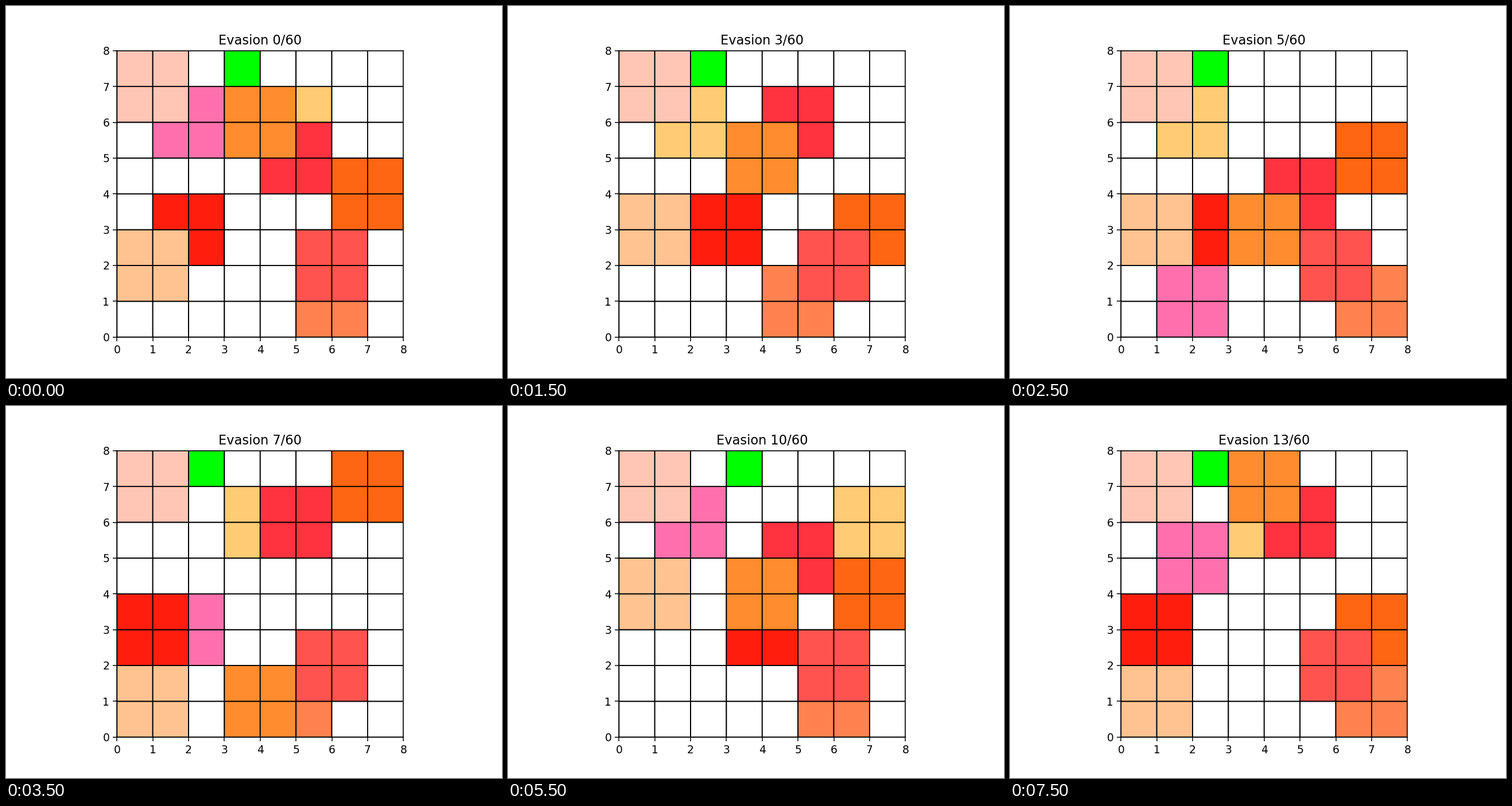
Animation, 864 px wide and 648 px high, one loop 8000 ms. Source, as a matplotlib script:

```python
import numpy as np
import matplotlib.pyplot as plt
from matplotlib.animation import FuncAnimation
from matplotlib.colors import ListedColormap

SIZE = 8
CYCLE = 60
FRAMES = 16
WAITS = (11, 14)            # only the runner moves here, the guards pause
RUNNER_RIGHT = (0, 11, 12, 13)

# Guards watch 2x2 blocks, painted back to front:
# colour, axis of travel, fixed coordinate, low end, high end, phase
GUARDS = [
    ("#ffcb74", "x", 5, 0, 6, 8),
    ("#ff70ad", "y", 1, 0, 6, 7),
    ("#ff6611", "y", 6, 1, 6, 8),
    ("#ff8250", "x", 0, 4, 6, 1),
    ("#ff1d0e", "x", 2, 0, 3, 5),
    ("#ff333f", "y", 4, 3, 6, 1),
    ("#ff8c2e", "y", 3, 0, 6, 5),
    ("#ffc391", "y", 0, 0, 3, 5),
    ("#ff534f", "x", 1, 5, 5, 0),
    ("#ffc5b5", "x", 6, 0, 0, 0),
]
RUNNER = len(GUARDS) + 1
COLORS = ["white"] + [g[0] for g in GUARDS] + ["#00ff00"]


def bounce(t, low, high, phase):
    span = high - low
    if span == 0:
        return low
    return high - abs((t + phase) % (2 * span) - span)


def step_of(frame):
    return frame - sum(frame >= w for w in WAITS)


def board(frame):
    t = step_of(frame)
    cells = np.zeros((SIZE, SIZE))
    for i, (_, axis, fixed, low, high, phase) in enumerate(GUARDS, 1):
        pos = bounce(t, low, high, phase)
        x, y = (pos, fixed) if axis == "x" else (fixed, pos)
        cells[y:y + 2, x:x + 2] = i
    cells[7, 3 if frame in RUNNER_RIGHT else 2] = RUNNER
    return cells


fig, ax = plt.subplots(figsize=(6.4, 4.8), dpi=135)
ax.set_aspect("equal")
mesh = ax.pcolor(board(0), cmap=ListedColormap(COLORS), vmin=-0.5,
                 vmax=RUNNER + 0.5, edgecolors="k", linewidths=1, snap=False)
ax.set_xlim(0, SIZE)
ax.set_ylim(0, SIZE)
ax.set_xticks(range(SIZE + 1))
ax.set_yticks(range(SIZE + 1))
title = ax.set_title("")


def update(frame):
    mesh.set_array(board(frame))
    title.set_text(f"Evasion {step_of(frame) % CYCLE}/{CYCLE}")
    return mesh, title


anim = FuncAnimation(fig, update, frames=FRAMES, interval=500,
                     repeat=True, repeat_delay=0)
plt.show()
```
